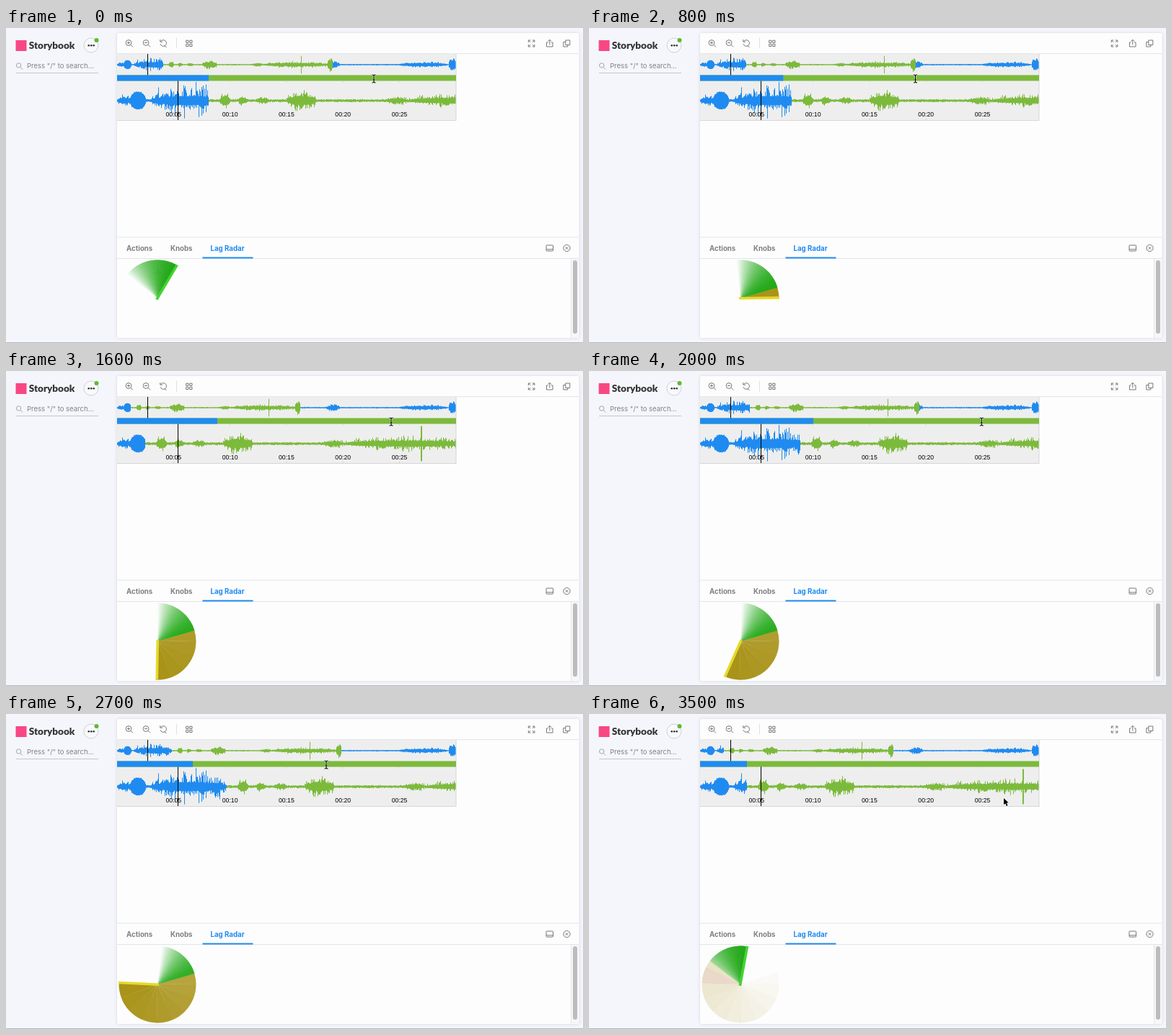
Write an HTML page with a canvas that moves like this. It is 800 px wide and 438 px high and loops after 3600 ms.

```html
<!DOCTYPE html>
<html lang="en">
<head>
<meta charset="utf-8">
<title>Waveform editor</title>
<style>
  html, body { margin: 0; width: 100%; height: 100%; overflow: hidden; background: #f5f6fc; }
  #stage { position: relative; width: 800px; height: 438px; overflow: hidden; }
  svg, canvas { position: absolute; left: 0; top: 0; }
  text { font-family: Inter, Roboto, sans-serif; }
  .icon { fill: none; stroke: #777; stroke-width: 1; }
  .pale { stroke: #9a9b9f; stroke-width: .9; }
  .tab { font-size: 9.7px; font-weight: 700; fill: #808083; }
  .panel { filter: drop-shadow(0 0.5px 2px rgba(0, 0, 0, .13)); }
</style>
</head>
<body>
<div id="stage">
  <svg width="800" height="438" viewBox="0 0 800 438">
    <rect width="800" height="438" fill="#f5f6fc"/>
    <rect y="437" width="800" height="1" fill="#b3b5bd"/>

    <!-- sidebar -->
    <rect x="13.5" y="17" width="15" height="15" fill="#f94784"/>
    <text x="31.8" y="29" style="font:900 13.5px Lato,sans-serif" fill="#333">Storybook</text>
    <circle cx="118" cy="24" r="10" fill="#f8f9fd" stroke="#c9ccd2" stroke-width=".9"/>
    <g fill="#333"><circle cx="114.7" cy="24.3" r="1.3"/><circle cx="118.2" cy="24.3" r="1.3"/><circle cx="121.7" cy="24.3" r="1.3"/></g>
    <circle cx="125.5" cy="17" r="3" fill="#62b82f"/>
    <g class="icon pale"><circle cx="17.6" cy="52" r="3.2"/><path d="M20 54.5l3 3"/></g>
    <text x="29" y="56.3" font-size="9.5" fill="#808185">Press "/" to search...</text>
    <path d="M14 62.5h114" stroke="#c4c6cc"/>

    <!-- main panel -->
    <rect class="panel" x="154" y="7" width="640.5" height="424" rx="3" fill="#fdfdfe"/>
    <path d="M154 35.7h640M154 291h640M154 320.5h640" stroke="#e3e4e8"/>
    <path d="M236.5 13.5v15" stroke="#dfe0e4"/>

    <g class="icon">
      <circle cx="170" cy="20.5" r="3.9"/><path d="M173 23.4l3 3M168 20.5h4M170 18.5v4"/>
      <circle cx="194" cy="20.5" r="3.9"/><path d="M197 23.4l3 3M192 20.5h4"/>
      <path d="M214.6 18.6a4.3 4.3 0 1 1 -.6 3.6M213.8 16v3.2h3.2M219.5 24.4l3 2.4"/>
      <path d="M249.7 17.2h3.2v3.2h-3.2zM254.8 17.2h3.2v3.2h-3.2zM249.7 22.3h3.2v3.2h-3.2zM254.8 22.3h3.2v3.2h-3.2z"/>
      <path d="M724.3 20v-3h3M729.8 17h3v3M732.8 23v3h-3M727.3 26h-3v-3M724.5 17.2l2.7 2.7M732.6 17.2l-2.7 2.7M732.6 25.8l-2.7-2.7M724.5 25.8l2.7-2.7"/>
      <path d="M751.5 20h-2v6h8.5v-6h-2M753.8 23.5v-7M751.5 18.5l2.3-2.3l2.3 2.3"/>
      <path d="M775.8 17h6v6.5h-6zM775.8 19.5h-3v6.5h6v-2.5"/>
      <rect x="749" y="302" width="9.5" height="8" rx=".8"/><path d="M749 307.8h9.5"/>
      <circle cx="777.5" cy="306" r="4.6"/><path d="M775.7 304.2l3.6 3.6M779.3 304.2l-3.6 3.6"/>
    </g>

    <text class="tab" x="167" y="309.6">Actions</text>
    <text class="tab" x="228" y="309.6">Knobs</text>
    <text class="tab" x="283.5" y="309.6" style="fill:#1f8bf0">Lag Radar</text>
    <rect x="272.5" y="318.5" width="70" height="2" fill="#1f8bf0"/>

    <rect x="783" y="321" width="11" height="110" fill="#f7f7f9"/>
    <path d="M783.5 321v110" stroke="#e6e6ea"/>
    <rect x="786" y="323" width="6" height="102" rx="3" fill="#bcbcbf"/>
  </svg>
  <canvas id="view" width="800" height="438"></canvas>
</div>

<script>
const LOOP = 3600, STEP = 100;
const LEFT = 154, WIDTH = 470, RIGHT = LEFT + WIDTH;
const BLUE = '#1f8bf0', GREEN = '#7cba3c', GRAY = '#eeeeee';
const ctx = document.getElementById('view').getContext('2d');

const rnd = n => { const v = Math.sin(n * 12.9898 + 4.1) * 43758.5453; return v - Math.floor(v); };
const rad = deg => (deg - 90) * Math.PI / 180;
const clamp = v => Math.max(0, Math.min(1, v));

// Sound bursts: [start, end, loudness, roughness]
const blueWave = makeWave(11, 940, [
  [0, 20, 12, .7], [18, 40, 14, .15], [46, 154, 30, .8], [154, 540, 8, .7],
  [578, 620, 14, .7], [780, 916, 13, .7], [920, 941, 29, .6]
]);
const greenWave = makeWave(5003, WIDTH, [
  [16, 30, 15, .6], [41, 53, 9, .6], [64, 84, 8, .7], [108, 150, 19, .7],
  [246, 276, 9, .7], [274, 458, 13, .7], [382, 384, 28, 0], [455, 471, 29, .6]
]);

function makeWave(seed, length, bursts) {
  return Array.from({ length }, (_, i) => [0, 1].map(side => {
    const r = rnd(i * 2 + side + seed) * (.6 + .4 * rnd((i >> 2) + seed));
    let h = 1 + 1.5 * r;
    for (const [start, end, loud, rough] of bursts) {
      if (i < start || i >= end) continue;
      const taper = Math.sin(Math.PI * (i - start + .5) / (end - start)) ** .4;
      h = Math.max(h, loud * taper * (1 - rough * (1 - r * r)));
    }
    return h;
  }));
}

// The pointer drags the clip edge: [ms, x]
const drag = [
  [350, 510], [700, 455], [800, 452.5], [950, 421], [1200, 417], [1400, 521],
  [1630, 536], [2030, 545], [2540, 444], [3100, 444], [3500, 575]
];
const DROP = 3100;

function pointerX(t) {
  const i = Math.max(1, drag.findIndex(key => key[0] >= t));
  const [t0, x0] = drag[i - 1], [t1, x1] = drag[i];
  return x0 + (x1 - x0) * clamp((t - t0) / (t1 - t0));
}
const pointerY = t => 70.5 + 46.5 * clamp((t - DROP) / 400);

// While dragging, the page redraws slowly and trails the pointer
const FIRST = 600, SLOW = 236, LAST = 9, QUICK = 16.6, RESUME = 2860;
const redraw = t => Math.min(LAST, Math.floor((t - FIRST) / SLOW));
const edgeAt = n => n < 0 ? 281 : pointerX(FIRST + n * SLOW - 150) - 225;

const sweep = t => 31 + .0972 * t;
const ticks = [];
const addTick = (t, hue, slow) => ticks.push({ t, a: sweep(t), hue, slow });
for (let t = -1000; t < 460; t += QUICK) addTick(t, 116);
for (let n = 0; n <= LAST; n++) addTick(FIRST + n * SLOW, n === LAST ? 27 : 51, true);
addTick(RESUME, 53, true);
for (let t = RESUME + QUICK; t < LOOP; t += QUICK) addTick(t, 116);

function rect(x, y, w, h, color) {
  ctx.fillStyle = color;
  ctx.fillRect(x, y, w, h);
}

function drawWave(wave, x0, zoom, mid, color) {
  for (let i = 0; i + zoom <= wave.length; i += zoom) {
    const x = x0 + i / zoom;
    if (x >= RIGHT) break;
    const [up, down] = wave[i].map((h, side) => (h + wave[i + zoom - 1][side]) / 2 / zoom);
    rect(x, mid - up, 1, up + down, color);
  }
}

// zoom is the number of samples in each pixel column
function drawTrack(top, height, mid, zoom, edge) {
  const x = Math.round(LEFT + (edge - LEFT) / zoom);
  const w = Math.min(WIDTH / zoom, RIGHT - x);
  rect(LEFT, top, WIDTH, height, GRAY);
  drawWave(blueWave, LEFT, zoom, mid, BLUE);
  rect(x, top, w, height, GRAY);
  drawWave(greenWave, x, zoom, mid, GREEN);
  rect(LEFT + 84 / zoom, top, 1, height, '#000');
}

function drawEditor(bar, edge) {
  drawTrack(36, 30, 51, 2, edge);
  drawTrack(73, 55, 101, 1, edge);
  rect(LEFT, 128, WIDTH, 1, '#d6d6d8');
  rect(RIGHT - .5, 36, 1, 93, '#d6d6d8');
  rect(LEFT, 65.5, WIDTH, 8, GREEN);
  rect(LEFT, 65.5, bar - LEFT, 8, BLUE);
  ctx.font = '8.7px "Liberation Sans", Arial, sans-serif';
  ctx.textAlign = 'center';
  for (let s = 5; s <= 25; s += 5) {
    const x = LEFT + s * 15.66;
    rect(x - .5, 73.5, 1, 2, '#d2d2d2');
    rect(x - .5, 126, 1, 2, '#d2d2d2');
    ctx.fillStyle = '#000';
    ctx.fillText('00:' + String(s).padStart(2, '0'), x, 122.5);
  }
}

function drawRadar(t) {
  const r = 53.5, keep = 50;
  const last = ticks.findLastIndex(tick => tick.t <= t);
  ctx.save();
  ctx.translate(210, 376);
  for (let i = last - keep + 1; i <= last; i++) {
    const { a, hue, slow } = ticks[i];
    ctx.globalAlpha = 1 - (last - i) / keep;
    ctx.fillStyle = `hsl(${hue} 74% 38%)`;
    ctx.beginPath();
    ctx.moveTo(0, 0);
    // neighbouring slices overlap so that no seams show
    ctx.arc(0, 0, r, rad(ticks[i - 1].a - (slow ? .5 : 1.6)), rad(a));
    ctx.fill();
  }
  ctx.globalAlpha = 1;
  ctx.rotate(rad(ticks[last].a));
  rect(-2, -2, r + 2.5, 3.6, ticks[last].slow ? '#e6d92c' : '#45d334');
  ctx.restore();
}

const beam = new Path2D('M-2.5-5.5Q0-5.5 0-4Q0-5.5 2.5-5.5M0-4.5V4.5M-2.5 5.5Q0 5.5 0 4Q0 5.5 2.5 5.5M-1.3 1.5H1.3');
const hand = new Path2D('M-2.5 5.5L-5-.2Q-5.6-1.9-4.2-1.7L-2.8.2L-3.6-4Q-3.4-5.4-2.3-4.4L-1.5-1.5V-5Q-.6-6.4.3-5L.5-1.5L1.3-4.8Q2.4-5.8 2.9-4.4L2.5-1L3.7-3Q5-3.8 5-2.3L4 2.5L3 5.5Z');
const arrow = new Path2D('M0 0V9.3L2.2 7.3L3.8 11L5.6 10.2L4 6.6H6.8Z');

function drawPointer(t) {
  const stroke = (path, color, width) => {
    ctx.strokeStyle = color;
    ctx.lineWidth = width;
    ctx.stroke(path);
  };
  ctx.save();
  ctx.translate(pointerX(t), pointerY(t));
  ctx.lineJoin = 'round';
  if (t < 3000) {
    stroke(beam, 'rgba(255,255,255,.75)', 2.4);
    stroke(beam, '#000', 1.1);
  } else if (t <= DROP) {
    ctx.fillStyle = '#fff';
    ctx.fill(hand);
    stroke(hand, '#000', 1);
  } else {
    stroke(arrow, '#fff', 1.6);
    ctx.fillStyle = '#000';
    ctx.fill(arrow);
  }
  ctx.restore();
}

function draw(now) {
  const t = Math.floor((now % LOOP) / STEP) * STEP;
  const n = redraw(t);
  ctx.clearRect(0, 0, 800, 438);
  drawEditor(edgeAt(n), edgeAt(t > RESUME ? n : n - 1));
  drawRadar(t);
  drawPointer(t);
}

const start = performance.now();
function loop() {
  draw(performance.now() - start);
  requestAnimationFrame(loop);
}
loop();
</script>
</body>
</html>
```
